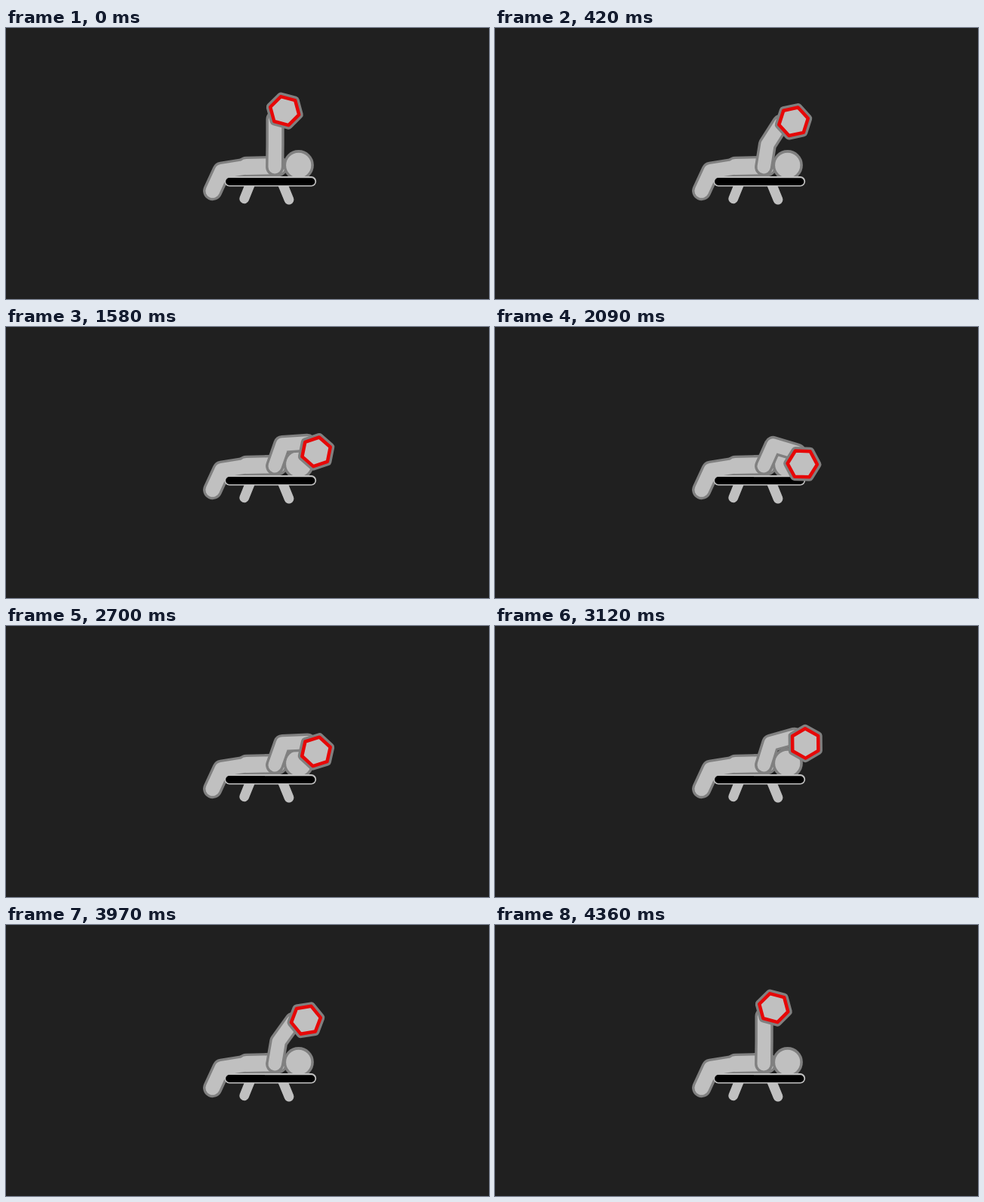
An HTML page that plays this animation: 640 px wide and 360 px high, repeating every 4.39 s.

```html
<!DOCTYPE html>
<html lang="en">
<head>
<meta charset="utf-8">
<title>Bench press</title>
<style>
  html, body { margin: 0; width: 100%; height: 100%; overflow: hidden; background: #202020; }
  svg { display: block; width: 100vw; height: 100vh; }
  path { fill: none; stroke-linecap: round; stroke-linejoin: round; }
  .edge { stroke: #808080; }
  .skin { stroke: #c0c0c0; }
</style>
</head>
<body>
<svg viewBox="0 0 640 360">
  <g id="legs">
    <path class="skin" stroke-width="12.8" d="M323.3 208L315.7 226.8M366.8 208L375 228"/>
  </g>
  <g id="body">
    <path class="edge" stroke-width="25.4" d="M273.8 216.4L285.8 190.3L317 185.2"/>
    <path class="edge" stroke-width="27.6" d="M318.5 184.5L360 183.5"/>
    <path class="skin" stroke-width="18.8" d="M273.8 216.4L285.8 190.3L317 185.2"/>
    <path class="skin" stroke-width="21" d="M318.5 184.5L360 183.5"/>
  </g>
  <circle cx="387.7" cy="182.3" r="18.4" fill="#c0c0c0" stroke="#808080" stroke-width="3.6"/>
  <g id="bench">
    <path class="skin" stroke-width="13.4" d="M296 203.8L404.5 203.8"/>
    <path stroke="#000" stroke-width="9.8" d="M296 204L404.5 204.1"/>
  </g>
  <path id="armEdge" class="edge" stroke-width="24.2"/>
  <path id="armSkin" class="skin" stroke-width="17.4"/>
  <g id="weight">
    <path class="edge hex" stroke-width="11"/>
    <path class="hex" style="fill:#c0c0c0" stroke="#e60808" stroke-width="4.5"/>
  </g>
</svg>
<script>
  const LOOP = 4390, STEP = 30.3, LAST = 144;
  const SHOULDER = [356.2, 184.7], UPPER = 30.4, FORE = 33;
  const REACH = 46, GRIP = 16, RADIUS = 19.7, TURN = -15;

  // step, upper arm angle, forearm angle (degrees)
  const POSES = [
    [0, -89.3, -90],
    [24, -75, -34],
    [48, -72, -8.5],
    [72, -65, 20.5],
    [90, -71, -3.7],
    [124, -75.5, -35],
    [144, -89.3, -90]
  ];

  const $ = id => document.getElementById(id);
  const rad = deg => deg * Math.PI / 180;
  const polar = ([x, y], r, deg) => [x + r * Math.cos(rad(deg)), y + r * Math.sin(rad(deg))];
  const line = points => 'M' + points.map(p => p.map(v => v.toFixed(2)).join(' ')).join('L');

  const corners = Array.from({ length: 6 }, (_, i) => polar([0, 0], RADIUS, i * 60 + TURN));
  document.querySelectorAll('.hex').forEach(el => el.setAttribute('d', line(corners) + 'Z'));

  function poseAt(n) {
    const i = Math.max(1, POSES.findIndex(p => p[0] >= n));
    const a = POSES[i - 1], b = POSES[i];
    const k = (n - a[0]) / (b[0] - a[0]);
    return [1, 2].map(j => a[j] + (b[j] - a[j]) * k);
  }

  function draw(ms) {
    const tick = Math.floor((ms % LOOP) / 10) * 10 + 5;
    const [upper, fore] = poseAt(Math.min(LAST, Math.floor(tick / STEP)));
    const elbow = polar(SHOULDER, UPPER, upper);
    const arm = line([SHOULDER, elbow, polar(elbow, FORE, fore)]);
    const [x, y] = polar(elbow, REACH, fore + GRIP);
    $('armEdge').setAttribute('d', arm);
    $('armSkin').setAttribute('d', arm);
    $('weight').setAttribute('transform', `translate(${x} ${y}) rotate(${fore})`);
  }

  function loop() {
    draw(performance.now());
    requestAnimationFrame(loop);
  }
  loop();
</script>
</body>
</html>
```
